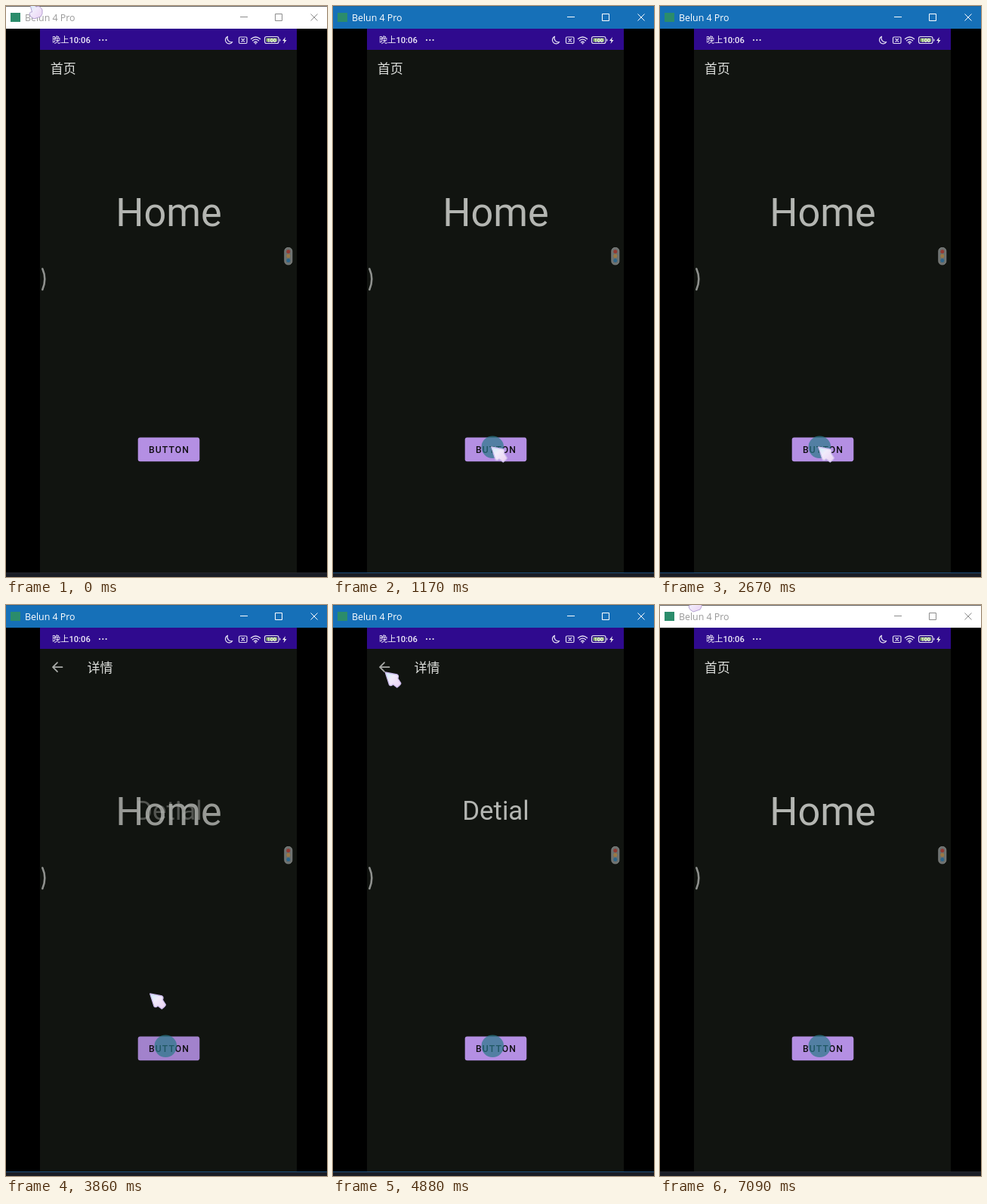
Recreate the animation shown at these times as an HTML page. Size 425 by 755 pixels, loop 7250 ms.

```html
<!DOCTYPE html>
<html lang="zh-CN">
<head>
<meta charset="utf-8">
<title>Navigation demo</title>
<style>
  html, body { margin: 0; width: 100%; height: 100%; overflow: hidden; background: #000; }
  svg { display: block; width: 425px; height: 755px; }
  .cjk { font-family: "Noto Sans CJK SC", "Noto Sans CJK", "Noto Sans", sans-serif; }
  .app { font-family: Roboto, sans-serif; text-anchor: middle; }
  .line { fill: none; stroke-linecap: round; stroke-linejoin: round; }
  #bar { fill: #fff; }
  #rim { fill: #333; opacity: .75; }
  #caption { font: 12.4px "Open Sans", sans-serif; fill: #999; }
  #clock { font: 500 11.2px Roboto, "Noto Sans CJK SC", "Noto Sans CJK", sans-serif; fill: #f2effa; }
  #controls { fill: none; stroke: #8c8c8c; }
  #edge { fill: #24262d; }
  .active #bar { fill: #1670b8; }
  .active #rim { opacity: .2; }
  .active #caption { fill: #fff; }
  .active #controls { stroke: #fff; }
  .active #edge { fill: #1d4c78; }
</style>
</head>
<body>
<svg id="stage" viewBox="0 0 425 755">
  <defs>
    <linearGradient id="pearl" x1="0" y1="0" x2="1" y2="1">
      <stop offset="0" stop-color="#c9edf8"/>
      <stop offset=".4" stop-color="#f1ebfb"/>
      <stop offset="1" stop-color="#ead0f2"/>
    </linearGradient>
  </defs>
  <rect width="425" height="755"/>

  <!-- window frame -->
  <rect id="bar" width="425" height="30"/>
  <rect id="rim" width="425" height="1"/>
  <rect x="6" y="9" width="13" height="12" fill="#2b8c6b"/>
  <text id="caption" x="25" y="20">Belun 4 Pro</text>
  <path id="controls" d="M310 14.500h10M356.500 10.500h9v9h-9zM403.500 10.500l9 9m0-9l-9 9"/>
  <rect y="749" width="425" height="6" fill="#1a1d25"/>
  <rect id="edge" y="749" width="425" height="1"/>

  <!-- phone screen -->
  <rect x="45" y="30" width="340" height="719" fill="#111410"/>
  <rect x="45" y="30" width="340" height="28" fill="#2f0a8e"/>
  <text id="clock" x="61" y="49.300">晚上10:06</text>
  <g fill="#eee">
    <circle cx="124" cy="45" r="1.100"/><circle cx="128.300" cy="45" r="1.100"/><circle cx="132.600" cy="45" r="1.100"/>
    <path d="M370 41l-4 5h2.500l-1 4 4-5h-2.500z"/>
  </g>
  <g class="line" stroke="#e4e0f2" stroke-width="1.200">
    <path d="M293.500 40.300a5 5 0 1 0 6.200 7.200a5.200 5.200 0 0 1-6.200-7.200z"/>
    <rect x="308.500" y="41" width="10.500" height="8.500" rx="1.500"/>
    <path d="M312 43.500l3.500 3.500m0-3.500l-3.500 3.500"/>
    <path d="M324.500 43.500q6-5 12 0M326.500 45.800q4-3.300 8 0M328.500 48q2-1.500 4 0" stroke-width="1.400"/>
    <circle cx="330.500" cy="49.500" r=".5"/>
    <rect x="342.500" y="40.500" width="18.500" height="9" rx="2.500"/>
    <path d="M362.800 44v2"/>
  </g>
  <rect x="344.500" y="42.500" width="14.500" height="5" rx="1" fill="#86ad62"/>
  <text class="app" x="351.700" y="47.700" font-size="7" font-weight="700" fill="#fff">100</text>

  <!-- toolbars -->
  <text id="homeBar" class="cjk" x="58.700" y="89" font-size="17" fill="#dcdedb">首页</text>
  <g id="detailBar">
    <path class="line" d="M74.500 82.200H62m6-6l-6 6l6 6" stroke="#a9aba8" stroke-width="1.700"/>
    <text class="cjk" x="107.500" y="89" font-size="17" fill="#dcdedb">详情</text>
  </g>

  <!-- pages -->
  <g class="app" fill="#b4b6b2">
    <text id="detail" x="215.500" y="284.300" font-size="34.800">Detial</text>
    <text id="home" x="215.500" y="291" font-size="52.200">Home</text>
  </g>
  <g id="button">
    <rect x="174.700" y="570.500" width="81.600" height="31.800" rx="3" fill="#b48fe3"/>
    <text class="app" x="216" y="591" font-size="12.200" font-weight="500" letter-spacing="1.100" fill="#100e13">BUTTON</text>
  </g>
  <circle id="touch" cx="211.300" cy="583.300" r="14.800" fill="#287887" opacity=".7"/>

  <!-- floating handles -->
  <path class="line" d="M48.300 347.500q6 13.500 0 27.500" stroke="#8f918e" stroke-width="2.600"/>
  <rect x="368.800" y="319.500" width="10" height="22.500" rx="4.500" fill="#6c706e" stroke="#8e9190" stroke-width=".8"/>
  <circle cx="373.800" cy="324.700" r="2.500" fill="#943a32"/>
  <circle cx="373.800" cy="330.500" r="2.500" fill="#9b7743"/>
  <circle cx="373.800" cy="336.500" r="2.500" fill="#2f668a"/>

  <!-- pointers -->
  <path id="arrow" d="M-.3 0L15.500 3Q18 4.500 16.300 8L20.300 14.300Q20.800 16 15.300 20L10 16Q7 18.800 5 16.500z"
        fill="url(#pearl)" stroke="#cbbcec" stroke-width="1.300" stroke-linejoin="round"/>
  <path id="hand" d="M32-1Q35-4 37-1L40 1Q45-1 48 5Q49 11 46 14L37 17Q31 14 31 10Q32 7 34.500 8z"
        fill="url(#pearl)" stroke="#b5a3d3" stroke-linejoin="round"/>
</svg>
<script>
const LOOP = 7250, STEPS = 86, STEP = LOOP / STEPS, LEAD = 30;

// Pointer tip: step, x, y
const path = [
  [0, 36, 2], [1, 48, 20], [4, 120, 300], [7, 206, 592], [9, 210, 583],
  [44, 210, 583], [45, 204, 556], [46, 191, 514], [50, 125, 270],
  [54, 82, 125], [58, 69.5, 89], [73, 69.5, 89], [75, 62, 38],
  [78, 54, 15], [82, 46, -2], [86, 42, -8]
];

// Page changes of four steps each
const changes = [
  { at: 15, to: "detail", dim: true },
  { at: 28, to: "home", dim: true },
  { at: 45, to: "detail", dim: true },
  { at: 62, to: "home", dim: false }
];

const el = id => document.getElementById(id);
const show = (id, on) => { el(id).style.opacity = on; };
const move = (id, x, y) => el(id).setAttribute("transform", `translate(${x} ${y})`);

function pointAt(k) {
  const i = path.findIndex(p => p[0] > k);
  const [k0, x0, y0] = path[i - 1], [k1, x1, y1] = path[i];
  const f = (k - k0) / (k1 - k0);
  return [x0 + (x1 - x0) * f, y0 + (y1 - y0) * f];
}

function draw(k) {
  el("stage").classList.toggle("active", k >= 11 && k < 84);
  el("touch").style.visibility = k >= 11 ? "visible" : "hidden";

  const change = changes.filter(c => c.at <= k).pop() || { at: -4, to: "home" };
  const p = Math.min(1, (k - change.at) / 4);
  const enter = 1 - (1 - p) ** 1.8, leave = 1 - p ** 1.25;
  const toHome = change.to === "home";
  show("home", toHome ? enter : leave);
  show("detail", toHome ? leave : enter);
  show("button", change.dim ? 1 - (1 - enter) * (1 - leave) : 1);
  show("homeBar", toHome ? 1 : 0);
  show("detailBar", toHome ? 0 : 1);

  const hand = k < 1 || k >= 84;
  show("hand", hand ? 1 : 0);
  show("arrow", hand ? 0 : 1);
  move("hand", k < 1 ? 0 : 7, k < 1 ? 0 : -8);
  move("arrow", ...pointAt(k));
}

let start;
function tick(now) {
  start ??= now;
  const t = (now - start) % LOOP;
  draw(Math.min(STEPS - 1, Math.floor((t + LEAD) / STEP)));
  requestAnimationFrame(tick);
}
draw(0);
requestAnimationFrame(tick);
</script>
</body>
</html>
```
